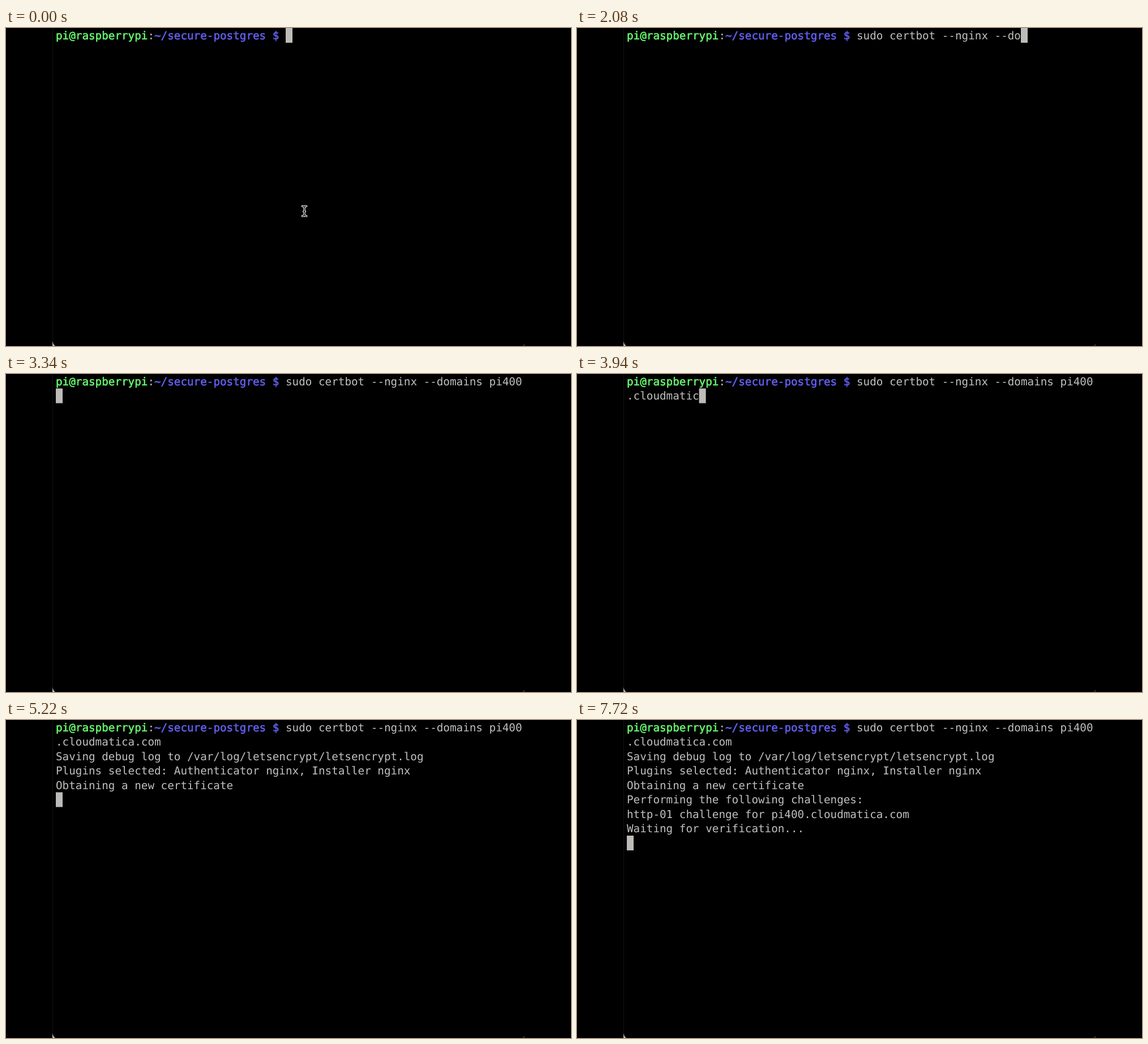
Recreate the animation shown at these times as an HTML page. Size 998x561 px, loop 8000 ms.

```html
<!DOCTYPE html>
<html lang="en">
<head>
<meta charset="utf-8">
<title>Terminal</title>
<style>
html, body { margin: 0; width: 100%; height: 100%; overflow: hidden; background: #000; }
#stage { position: absolute; left: 0; top: 0; width: 998px; height: 561px; overflow: hidden; background: #000; }
#term {
  position: absolute; left: 88px; top: .7px; margin: 0; color: #c0c0be; white-space: pre;
  font: 19.27px/25.5px "DejaVu Sans Mono", monospace;
  font-variant-ligatures: none; font-kerning: none; text-rendering: geometricPrecision;
}
/* semi-bold: regular glyphs with a thin outline */
#term b { font-weight: 400; -webkit-text-stroke: .6px currentColor; }
.user { color: #66f76c; }
.path { color: #615ff0; }
#block { position: absolute; left: 88px; top: 0; width: 11.8px; height: 25.5px; background: #bdbcb9; }
svg { position: absolute; left: 0; top: 0; }
</style>
</head>
<body>
<div id="stage">
  <pre id="term"><b class="user">pi@raspberrypi</b>:<b class="path">~/secure-postgres $</b> <span id="out"></span></pre>
  <div id="block"></div>
  <svg width="998" height="561" fill="none">
    <defs>
      <path id="beam" d="M-3.6 -8.8Q0 -8.8 0 -5.8V5.8Q0 8.8 -3.6 8.8M3.6 -8.8Q0 -8.8 0 -5.8M0 5.8Q0 8.8 3.6 8.8M-1.3 .8H1.3"/>
    </defs>
    <path d="M82.5 0V553" stroke="#121217"/>
    <path d="M82 552Q83 558 87 561H82Z" fill="#b4b4b4"/>
    <path d="M913 561Q915 560 916 558" stroke="#777"/>
    <g id="mouse" stroke-linecap="round">
      <use href="#beam" stroke="#f4f4ee" stroke-width="3.6"/>
      <use href="#beam" stroke="#000" stroke-width="1.3"/>
    </g>
  </svg>
</div>
<script>
const LOOP = 8000, CELL = 11.6, ROW = 25.5, COLS = 71, PROMPT = 35;
const command = "sudo certbot --nginx --domains pi400.cloudmatica.com";

// [ms, characters typed]
const typing = [
  [0, 0], [20, 1], [840, 12], [1560, 19], [1660, 20], [2080, 25], [2400, 30],
  [2500, 31], [2780, 32], [3340, 36], [3500, 37], [3940, 47], [4040, 48], [4220, 52]
];
// [ms, line]
const output = [
  [4900, "Saving debug log to /var/log/letsencrypt/letsencrypt.log"],
  [5060, "Plugins selected: Authenticator nginx, Installer nginx"],
  [5180, "Obtaining a new certificate"],
  [6880, "Performing the following challenges:"],
  [6880, "http-01 challenge for pi400.cloudmatica.com"],
  [6960, "Waiting for verification..."]
];
const ENTER = 4600, MOUSE_OFF = 1200;
const mousePath = [[0, 527], [120, 527], [520, 524]];

const [out, block, mouse] = ["out", "block", "mouse"].map(id => document.getElementById(id));

function lerp(table, t) {
  const i = table.findIndex(p => p[0] > t);
  if (i < 0) return table[table.length - 1][1];
  const [t0, v0] = table[i - 1], [t1, v1] = table[i];
  return v0 + (v1 - v0) * (t - t0) / (t1 - t0);
}

function draw(t) {
  const typed = Math.floor(lerp(typing, t) + 1e-6);
  const wrap = COLS - PROMPT;
  const lines = [command.slice(0, Math.min(typed, wrap))];
  if (typed >= wrap) lines.push(command.slice(wrap, typed));
  if (t >= ENTER) {
    for (const [at, line] of output) if (t >= at) lines.push(line);
    lines.push("");
  }
  const text = lines.join("\n");
  if (out.textContent !== text) out.textContent = text;

  const row = lines.length - 1;
  const col = lines[row].length + (row ? 0 : PROMPT);
  block.style.transform = `translate(${col * CELL}px, ${row * ROW}px)`;

  mouse.setAttribute("transform", `translate(${lerp(mousePath, t)} 323)`);
  mouse.style.display = t < MOUSE_OFF ? "" : "none";
}

const start = performance.now();
function tick() {
  draw((performance.now() - start) % LOOP);
  requestAnimationFrame(tick);
}
tick();
</script>
</body>
</html>
```
